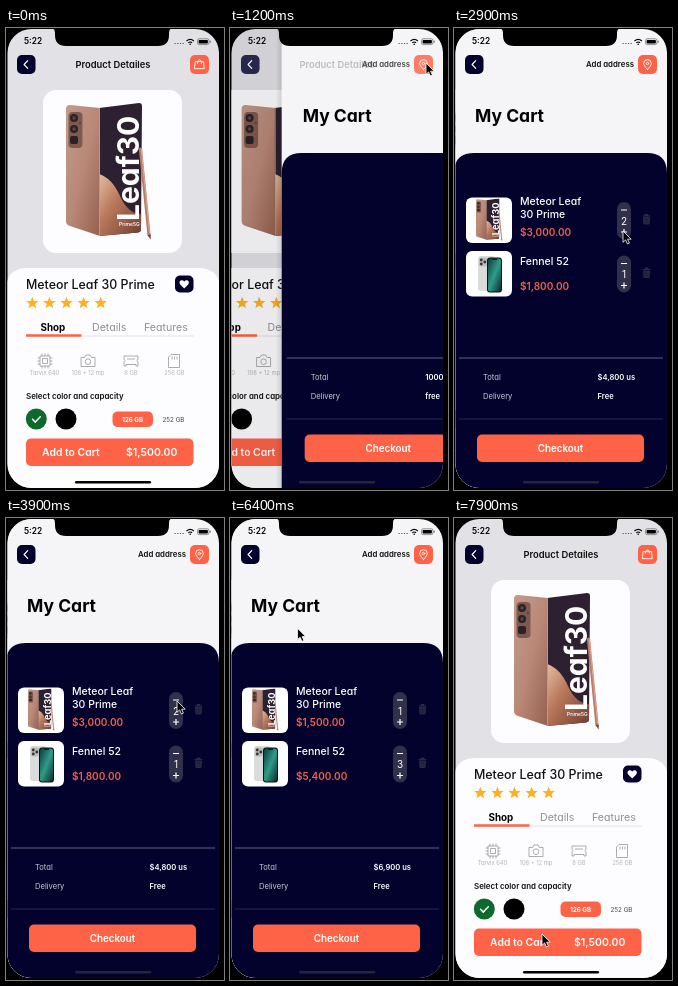
Write an HTML page that moves like this. It is 218 by 462 pixels and loops after 8 s.

```html
<!DOCTYPE html>
<html lang="en">
<head>
<meta charset="utf-8">
<title>Shop and cart</title>
<style>
html, body { margin: 0; height: 100%; overflow: hidden; background: #000; }
svg { display: block; width: 100%; height: 100%; }
text { font-family: Inter, Lato, sans-serif; font-feature-settings: "cv11"; }
.m { text-anchor: middle; }
.s { font-weight: 600; }
.b { font-weight: 700; }
.w { fill: #fff; }
.paper { fill: #fdfcff; }
.navy { fill: #02022c; }
.hot { fill: #ff6347; }
.line { fill: none; stroke: #fff; stroke-linecap: round; stroke-linejoin: round; }
.spec { fill: none; stroke: #999; stroke-width: .8; }
.label { font-size: 5.8px; fill: #b4b4b4; text-anchor: middle; }
.name { font-size: 10.5px; font-weight: 500; fill: #fff; }
.price { font-size: 10px; font-weight: 600; fill: #f0604a; }
.sum { font-size: 7.6px; }
</style>
</head>
<body>
<svg viewBox="0 0 218 462" preserveAspectRatio="none">
<defs>
  <clipPath id="screen"><rect x="1.500" y="1" width="211.500" height="459" rx="24"/></clipPath>
  <clipPath id="face"><path d="M93 80L133 75Q136 75 136 78L135 201Q135 204 132 204.500L93 208Z"/></clipPath>
  <linearGradient id="copper" x2="1" y2="1">
    <stop stop-color="#c39a8a"/><stop offset=".5" stop-color="#b98877"/><stop offset="1" stop-color="#94604f"/>
  </linearGradient>
  <linearGradient id="dune" x2="1" y2="1">
    <stop stop-color="#e3bfa4"/><stop offset=".4" stop-color="#b9785a"/><stop offset="1" stop-color="#6b3b30"/>
  </linearGradient>
  <linearGradient id="teal" x2="1" y2="1">
    <stop stop-color="#0c3b3b"/><stop offset=".5" stop-color="#2f9c86"/><stop offset="1" stop-color="#0a2a33"/>
  </linearGradient>
  <linearGradient id="edge"><stop stop-opacity="0"/><stop offset="1" stop-opacity=".12"/></linearGradient>

  <g id="phone">
    <path d="M60 81Q60 77 64 77L94 80V208L64 198Q60 197 60 193Z" fill="url(#copper)"/>
    <g clip-path="url(#face)">
      <rect x="90" y="70" width="50" height="140" fill="#2d2030"/>
      <path d="M93 146Q106 150 114 168T136 186V210H93Z" fill="url(#dune)"/>
      <path d="M93 80V208" stroke="#c59582" stroke-width="2"/>
    </g>
    <rect x="62.500" y="84" width="14" height="36" rx="4" fill="#80594e"/>
    <g fill="#2b2225"><circle cx="68" cy="90" r="4"/><circle cx="68" cy="101" r="4"/><rect x="64" y="108" width="8" height="8" rx="2"/></g>
    <g fill="#56494d"><circle cx="68" cy="90" r="1.700"/><circle cx="68" cy="101" r="1.700"/><circle cx="74" cy="95" r="1.200"/></g>
    <text class="w b" font-size="30" transform="translate(133 193) rotate(-90)">Leaf30</text>
    <text class="w s" font-size="5" x="113" y="198">Prime5G</text>
    <path d="M134.500 121L143 207" stroke="#b97c67" stroke-width="3.200" stroke-linecap="round"/>
    <path d="M135.300 121L143.500 205" stroke="#e0b4a1" stroke-width=".8"/>
    <path d="M141.600 207l3.200-.3-.2 5z" fill="#6f4638"/>
  </g>
  <g id="back">
    <rect class="navy" x="11" y="27" width="18.500" height="19" rx="5"/>
    <path class="line" d="M21.700 32.700l-3.600 3.800 3.600 3.800" stroke-width="1.200"/>
  </g>
  <rect id="action" class="hot" x="184" y="27" width="19" height="19" rx="5"/>
  <path id="star" fill="#ffb020" d="M0-6.300L1.700-2.100 6.200-1.900 2.700.9 3.900 5.300 0 2.800-3.900 5.300-2.700.9-6.200-1.900-1.700-2.100Z"/>
  <g id="stepper">
    <rect x="163" y="174" width="14" height="37" rx="7" fill="#30304a"/>
    <path d="M167 182h6M167 204h6M170 201v6" stroke="#fff" stroke-width="1.200"/>
    <path d="M188.500 188h8M191 188v-1.500h3v1.500M189.500 189.500h6l-.5 6.500h-5z" fill="#22223f" stroke="#2b2b48"/>
  </g>
</defs>

<rect width="218" height="462"/>
<g clip-path="url(#screen)">
  <g id="product">
    <rect width="218" height="462" fill="#e2e1e5"/>
    <rect class="paper" x="37" y="62" width="139" height="163" rx="13"/>
    <use href="#phone"/>
    <path class="paper" d="M0 462V262Q0 240 22 240H192Q214 240 214 262V462Z"/>
    <text x="20" y="260.500" font-size="12.400" font-weight="500" fill="#111">Meteor Leaf 30 Prime</text>
    <rect class="navy" x="169" y="247.500" width="18.500" height="17" rx="5"/>
    <path class="w" d="M178.200 260.500l-4-4.100c-2.300-2.700 1.700-5.800 4-2.800 2.300-3 6.300.1 4 2.800z"/>
    <use href="#star" x="26.300" y="275"/><use href="#star" x="43.400" y="275"/><use href="#star" x="60.500" y="275"/><use href="#star" x="77.600" y="275"/><use href="#star" x="94.700" y="275"/>

    <g font-size="10.600" fill="#8f8f8f">
      <text class="b" x="34.500" y="303" font-size="9.800" fill="#000">Shop</text>
      <text x="86" y="303">Details</text><text x="138" y="303">Features</text>
    </g>
    <path d="M20 308H188" stroke="#e2e2e2"/>
    <path d="M20 307.500H75.500" stroke="#ff6347" stroke-width="2.400"/>

    <g class="spec">
      <path d="M34 328h10v10h-10zM36.500 330.500h5v5h-5zM36 328v-2.500M39 328v-2.500M42 328v-2.500M36 338v2.500M39 338v2.500M42 338v2.500M34 330h-2.500M34 333h-2.500M34 336h-2.500M44 330h2.500M44 333h2.500M44 336h2.500"/>
      <path d="M75 329.500h3.500l1.500-2.500h4l1.500 2.500h3.500v9h-14z"/><circle cx="82" cy="333.700" r="2.800"/>
      <path d="M118 328h14v3q-2 1.500 0 3v4h-2v-1.500h-10v1.500h-2v-4q2-1.500 0-3zM121 331h8"/>
      <path d="M165 326.500h8.500v13h-11v-10.500zM166 328.500v3M168.500 328.500v3M171 328.500v3"/>
    </g>
    <text class="label" x="38.500" y="347">Tarvix 640</text><text class="label" x="82" y="347">108 + 12 mp</text>
    <text class="label" x="125" y="347">8 GB</text><text class="label" x="168.500" y="347">256 GB</text>

    <text class="s" x="20" y="371" font-size="7.900" fill="#111">Select color and capacity</text>
    <circle cx="30.300" cy="391" r="10.500" fill="#0d6a2c"/>
    <path class="line" d="M26.500 391.300l2.800 2.800 5-5.400" stroke-width="1.500"/>
    <circle cx="60" cy="391" r="10.500"/>
    <rect class="hot" x="106.500" y="383.500" width="40.500" height="15.500" rx="5"/>
    <text class="m w b" x="126.700" y="393.600" font-size="6.200">126 GB</text>
    <text class="m" x="167.500" y="393.600" font-size="6.300" fill="#444">252 GB</text>
    <rect class="hot" x="20" y="410.500" width="167.500" height="27.500" rx="5"/>
    <text class="w s" x="36" y="428.300" font-size="10.400">Add to Cart</text>
    <text class="w s" x="120" y="428.300" font-size="10.500">$1,500.00</text>
  </g>
  <rect id="dim" width="218" height="462"/>

  <g id="cart">
    <rect x="-6" width="6" height="462" fill="url(#edge)"/>
    <rect width="218" height="462" fill="#f5f5f7"/>
    <text class="b" x="21" y="93.500" font-size="17.500">My Cart</text>
    <path class="navy" d="M0 462V145Q0 125 20 125H193Q213 125 213 145V462Z"/>
    <g id="items">
      <rect class="w" x="12" y="169.500" width="46" height="45.500" rx="6"/>
      <use href="#phone" transform="translate(35 192.300) scale(.31) translate(-102 -145)"/>
      <text class="name" x="66" y="177">Meteor Leaf</text><text class="name" x="66" y="190">30 Prime</text>
      <text class="price" id="priceA" x="66" y="208"></text>
      <use href="#stepper"/>
      <text class="w m" id="qtyA" x="170" y="196.500" font-size="10"></text>

      <rect class="w" x="12" y="223" width="46" height="45.500" rx="6"/>
      <rect x="24" y="228" width="17" height="35" rx="3" fill="#d9dcda"/>
      <rect x="25" y="229.500" width="8" height="9" rx="2" fill="#b9bfbc"/>
      <g fill="#333"><circle cx="27.300" cy="232" r="1.400"/><circle cx="27.300" cy="236" r="1.400"/><circle cx="30.800" cy="234" r="1.400"/></g>
      <rect x="33" y="229.500" width="15" height="35" rx="3" fill="#111"/>
      <rect x="34" y="230.500" width="13" height="33" rx="2" fill="url(#teal)"/>
      <rect x="38" y="230.500" width="5" height="1.400" fill="#111"/>
      <text class="name" x="66" y="237">Fennel 52</text>
      <text class="price" id="priceB" x="66" y="261.500"></text>
      <use href="#stepper" y="53.500"/>
      <text class="w m" id="qtyB" x="170" y="250" font-size="10"></text>
    </g>
    <path d="M5 330H209" stroke="#62627e"/>
    <path d="M5 391H209" stroke="#33334f" stroke-width=".8"/>
    <g class="sum" fill="#c9c9d4"><text x="29" y="351.500">Total</text><text x="29" y="370.700">Delivery</text></g>
    <g class="sum w s"><text id="total" x="143.500" y="351.500"></text><text id="delivery" x="143.500" y="370.700"></text></g>
    <rect class="hot" x="23" y="406.500" width="167" height="27.500" rx="5"/>
    <text class="w m s" x="106.500" y="424" font-size="9.800">Checkout</text>
  </g>

  <g id="headA">
    <use href="#back"/><use href="#action"/>
    <text class="m s" x="107" y="39.500" font-size="9.400" fill="#111">Product Detailes</text>
    <path class="line" d="M189.500 33.700h8l.7 7h-9.400zM191.500 35.300v-1.600q2-3.600 4 0v1.600" stroke-width=".9"/>
  </g>
  <g id="headB">
    <use href="#back"/><use href="#action"/>
    <text class="s" x="132" y="39.300" font-size="7.800" fill="#111">Add address</text>
    <path class="line" d="M193.500 41.500q-3.800-4-3.800-6a3.800 3.800 0 0 1 7.600 0q0 2-3.800 6z" stroke-width=".9"/>
    <circle class="line" cx="193.500" cy="35.500" r="1.200" stroke-width=".8"/>
  </g>

  <text class="s" x="18" y="16" font-size="8.300">5:22</text>
  <path d="M168.500 15.500h9.500" stroke="#555" stroke-width="1.200" stroke-dasharray="1.200 1.500"/>
  <path d="M180.500 13q3.700-3.200 7.400 0M182.300 14.800q1.900-1.600 3.800 0" fill="none" stroke="#000" stroke-width="1.200"/>
  <circle cx="184.200" cy="16.300" r=".8"/>
  <rect x="191.500" y="10.800" width="11.500" height="5.800" rx="1.700" fill="none" stroke="#666" stroke-width=".7"/>
  <rect x="192.600" y="11.900" width="9.300" height="3.600" rx=".8"/><path d="M204.200 12.700v2" stroke="#666"/>
  <path d="M44 0q5 0 5 5v2q0 11 11 11h92q11 0 11-11v-2q0-5 5-5z"/>
  <rect id="home" x="69" y="453" width="76" height="2.600" rx="1.300"/>
</g>
<path id="cursor" d="M0 0V11.300L2.600 8.900 4.400 13 6.400 12.100 4.600 8.200H8.200Z" stroke="#fff" stroke-width=".8"/>
</svg>

<script>
const LOOP = 8000, WIDTH = 213, LOADED = 1600;
const $ = id => document.getElementById(id);
const set = (id, name, value) => $(id).setAttribute(name, value);

// time, x, y of the pointer tip
const path = [
  [0, 232, 112], [450, 232, 112], [900, 196, 35], [1400, 196, 35], [1900, 158, 106],
  [2500, 169, 203], [3300, 169, 203], [3700, 171, 183], [4400, 171, 183],
  [4800, 171, 257], [5900, 171, 257], [6700, 20, 43], [7200, 20, 43], [7850, 88, 416], [8000, 88, 416]
];
// time, first quantity, second quantity
const taps = [[0, 1, 1], [2600, 2, 1], [3100, 3, 1], [3800, 2, 1], [4300, 1, 1], [4950, 1, 2], [5600, 1, 3]];

// critically damped slide, 0 to 1
function spring(ms) {
  const k = Math.max(0, ms) * .0136;
  return k > 9 ? 1 : 1 - (1 + k) * Math.exp(-k);
}

function pointer(t) {
  const i = path.findIndex(p => p[0] > t);
  const [t0, x0, y0] = path[i - 1], [t1, x1, y1] = path[i];
  const u = (t - t0) / (t1 - t0), e = u * u * (3 - 2 * u);
  return [x0 + (x1 - x0) * e, y0 + (y1 - y0) * e];
}

const dollars = n => "$" + n.toLocaleString("en-US");

function draw(t) {
  const open = spring(t - 1000) * (1 - spring(t - 6942));
  set("product", "transform", `translate(${-.3 * WIDTH * open})`);
  set("cart", "transform", `translate(${WIDTH * (1 - open)})`);
  set("cart", "visibility", open > 0 ? "visible" : "hidden");
  set("dim", "opacity", .1 * open);
  set("headA", "opacity", 1 - open);
  set("headB", "opacity", open);
  set("home", "fill", open > .5 ? "#25253c" : "#000");

  const [, a, b] = taps.findLast(tap => tap[0] <= t), ready = t >= LOADED;
  set("items", "visibility", ready ? "inherit" : "hidden");
  $("qtyA").textContent = a;
  $("qtyB").textContent = b;
  $("priceA").textContent = dollars(1500 * a) + ".00";
  $("priceB").textContent = dollars(1800 * b) + ".00";
  $("total").textContent = ready ? dollars(1500 * a + 1800 * b) + " us" : "1000";
  $("delivery").textContent = ready ? "Free" : "free";
  set("cursor", "transform", `translate(${pointer(t)})`);
}

function tick() {
  draw(performance.now() % LOOP);
  requestAnimationFrame(tick);
}
tick();
</script>
</body>
</html>
```
